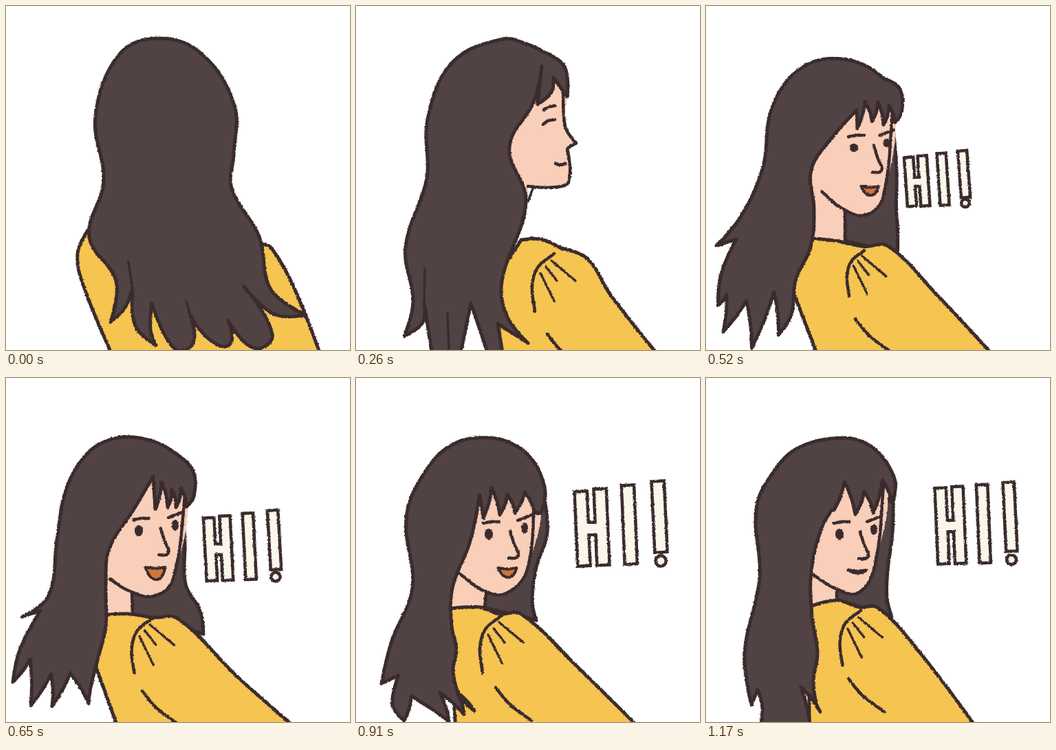
Write an HTML page that moves like this. It is 500 px wide and 500 px high and loops after 1300 ms.

```html
<!DOCTYPE html>
<html>
<head>
<meta charset="utf-8">
<style>
html, body { margin: 0; width: 100%; height: 100%; overflow: hidden; background: #fff }
svg { display: block; width: 100vw; height: 100vh }
path, ellipse { stroke: #3a2b2d; stroke-width: 5; stroke-linejoin: round; stroke-linecap: round; fill: none }
.hair { fill: #514244 }
.shirt { fill: #f6c451 }
.skin { fill: #f9cfb9; stroke: none }
.line { stroke-width: 4.5 }
.thin { stroke-width: 3.5 }
.mouth { fill: #d0763c; stroke-width: 4 }
.eye { fill: #3a2b2d; stroke: none }
.bar { stroke-linecap: square }
.cream { stroke: #faf6ea }
.dot { fill: #faf6ea; stroke-width: 4.5 }
</style>
</head>
<body>
<svg viewBox="0 0 500 500">
  <filter id="crayon" filterUnits="userSpaceOnUse" x="0" y="0" width="500" height="500" color-interpolation-filters="sRGB">
    <feTurbulence type="fractalNoise" baseFrequency=".4" numOctaves="2" seed="4"/>
    <feDisplacementMap in="SourceGraphic" scale="3" xChannelSelector="R" yChannelSelector="G"/>
  </filter>
  <g id="stage" filter="url(#crayon)"></g>
</svg>
<script>
const pt = (x, y, sharp = false) => ({ x, y, sharp });
const add = (p, x, y) => pt(p.x + x, p.y + y);
const mid = (p, q, sharp) => pt((p.x + q.x) / 2, (p.y + q.y) / 2, sharp);

// "x,y" is smooth, "x,y!" a corner. "x,y^h,dx" is a lock's tip, followed by
// a notch h above (and dx beside) the middle of the way to the next point.
function P(text) {
  const words = text.split(' ').map(w => w.split('^'));
  const keys = words.map(([w, notch]) => pt(...w.split(',').map(parseFloat), !!notch || w.endsWith('!')));
  return keys.flatMap((p, i) => {
    if (!words[i][1]) return [p];
    const q = keys[i + 1], [h, dx = 0] = words[i][1].split(',').map(Number);
    const m = mid(p, q), notch = pt(m.x + dx, m.y - h, true);
    return [p, add(mid(p, notch), 2, 0), notch, add(mid(notch, q), 2, 0)];
  });
}

// Average two values of the same structure.
function blend(a, b) {
  if (typeof a === 'number') return (a + b) / 2;
  if (Array.isArray(a)) return a.map((v, i) => blend(v, b[i]));
  if (typeof a !== 'object') return a;
  return Object.fromEntries(Object.keys(a).map(k => [k, blend(a[k], b[k])]));
}

function curve(pts, closed) {
  const n = pts.length;
  const at = i => closed ? pts[(i + n) % n] : pts[Math.max(0, Math.min(n - 1, i))];
  const handle = (i, len) => {
    const p = at(i), a = at(i - 1), b = at(i + 1);
    const k = p.sharp ? 0 : len / 2.7 / (Math.hypot(b.x - a.x, b.y - a.y) || 1);
    return [p.x + (b.x - a.x) * k, p.y + (b.y - a.y) * k];
  };
  let d = `M${pts[0].x},${pts[0].y}`;
  for (let i = 0; i < (closed ? n : n - 1); i++) {
    const p = at(i), q = at(i + 1), len = Math.hypot(q.x - p.x, q.y - p.y);
    d += `C${handle(i, len)} ${handle(i + 1, -len)} ${q.x},${q.y}`;
  }
  return d + (closed ? 'Z' : '');
}

const shape = (kind, pts) => `<path class="${kind}" d="${curve(pts, true)}"/>`;
const line = (kind, ...pts) => `<path class="${kind}" d="${curve(pts)}"/>`;
const oval = (kind, p, rx, ry) => `<ellipse class="${kind}" cx="${p.x}" cy="${p.y}" rx="${rx}" ry="${ry}"/>`;

// Puffed seam, three creases fanning out of it, and the elbow fold.
function sleeve(top, size, elbow) {
  const from = (x, y) => add(top, x * size, y * size);
  let out = line('line', top, from(-24, 20), from(-32, 48), from(-28, 84));
  for (let i = 0; i < 3; i++) {
    const start = from(-4 - 8 * i, 10 + 9 * i);
    const angle = (40 + 12 * i) * Math.PI / 180, len = 46 - 20 * (i % 2);
    out += line('thin', start, add(start, len * Math.cos(angle), len * Math.sin(angle)));
  }
  return out + line('line', elbow, add(elbow, 20, 24), add(elbow, 52, 48));
}

function features({ eyes: [left, right], lid, mouth, smile }) {
  const bridge = add(mid(left, right), 5, 0);
  const { w, open } = smile;
  return line('line', add(left, -8, -16), add(left, 3, -18), add(left, 15, -18)) +
    line('line', add(right, -10, -11), add(right, 0, -15), add(right, 11, -19)) +
    oval('eye', left, 6, lid) + oval('eye', right, 5, lid) +
    line('line', bridge, add(bridge, 6, 19), add(bridge, 12, 33), add(bridge, 8, 39), add(bridge, -2, 39)) +
    shape('mouth', [
      pt(mouth.x - w, mouth.y, true), pt(mouth.x, mouth.y + 1.5), pt(mouth.x + w, mouth.y, true),
      add(mouth, w / 2, open), add(mouth, -w / 3, open)
    ]);
}

// Outlined letters: each bar is a wide dark stroke with a narrower light one on top.
function greeting({ x, y, span, height, rise }) {
  const bars = [0, .25, .61, 1].map(t => {
    const base = y + height - rise * t * .3 - (t === 1 ? height * .17 : 0);
    return `M${x + span * t - 2},${y - rise * t}L${x + span * t + 2},${base}`;
  });
  const d = bars.join('') + `M${x},${y + height / 2}h${span / 4}`;
  const wide = 6 + span * .15, r = 1.5 + span * .055;
  return `<path class="bar" style="stroke-width:${wide}" d="${d}"/>` +
    `<path class="bar cream" style="stroke-width:${wide - 9}" d="${d}"/>` +
    oval('dot', pt(x + span + 2, y + height + 2), r, r);
}

function talk(p) {
  const neck = p.neck;
  return shape('hair', [...p.back, neck[1], neck[0]]) +
    shape('skin', [...p.jaw, ...p.cover, p.body[0], neck[1], neck[0]]) +
    line('line', ...neck) + line('line', ...p.jaw) +
    shape('shirt', p.body) + sleeve(p.shoulder, p.puff, p.elbow) +
    features(p) + shape('hair', p.hair) + greeting(p.word);
}

const away = (body, hair, strands) => shape('shirt', P(body)) + shape('hair', P(hair)) +
  strands.map(s => line('thin', ...P(s))).join('');

function profile() {
  const face = P('301,110 304,175 320,199! 307,207! 311,243 303,261 250,262!');
  return shape('shirt', P('240,340! 268,339 298,352! 336,367 370,420 443,512! 200,515! 208,390!')) +
    sleeve(pt(288, 360), 1, pt(278, 477)) +
    shape('skin', [...face, ...P('250,283! 215,225! 250,100!')]) +
    line('line', ...face) + line('thin', pt(257, 265), pt(250, 284)) +
    ['273,151 280,147 289,145', '272,172 279,167 289,165', '290,229 297,231 304,229']
      .map(s => line('line', ...P(s))).join('') +
    shape('hair', P('213,48 250,56 273,67! 303,88 307,132! 287,104! 284,125 264,143! 270,88! 258,140 223,205 247,285 212,400 220,452 250,490! 206,462! 215,515! 195,515! 167,432! 150,515! 112,515! 99,432! 97,460 70,480! 83,430 72,350 103,250 104,165 140,82')) +
    line('thin', pt(100, 382), pt(99, 434)) + line('thin', pt(133, 447), pt(135, 500));
}

const small = {
  back: P('284,150! 294,235 292,290 275,315 270,345!'),
  jaw: P('186,248 212,276 246,291 271,265 283,120'),
  cover: P('240,110! 145,235!'),
  neck: P('221,285! 220,338!'),
  body: P('165,332! 200,340 248,351 278,347 333,403 420,515! 165,515! 128,425! 120,350!'),
  shoulder: pt(247, 362), puff: .62, elbow: pt(236, 455),
  eyes: P('237,190 279,184'), lid: 4.5, mouth: pt(259, 249), smile: { w: 11, open: 7 },
  hair: P('200,67 237,76 268,100! 290,104 296,135 286,152^26 269,157^36 248,148^30 223,165! 224,160! 185,186 156,228 169,290 160,338 127,388 126,445 91,483^98,26 66,518^68,12 14,471^20,5 25,428! 24,385 38,340! 6,350! 40,295 92,232 98,155 121,103 158,74'),
  word: { x: 297, y: 242, span: 63, height: 40, rise: 8 }
};

const open = {
  back: P('258,190! 260,240 261,300 282,338 287,372!'),
  jaw: P('151,292 178,309 215,317 243,292 262,155'),
  cover: P('215,130! 130,250!'),
  neck: P('183,312! 184,345!'),
  body: P('148,344! 180,343 212,348 250,350 335,433 425,512! 165,515! 130,418! 125,360!'),
  shoulder: pt(213, 349), puff: .95, elbow: pt(198, 455),
  eyes: P('193,222 246,214'), lid: 8, mouth: pt(217, 275), smile: { w: 14.5, open: 16 },
  hair: P('185,86 222,95 250,112! 272,135 273,172 262,187^27 247,188^26 235,188^38 217,191! 214,143! 185,192 150,248 145,300 145,360 133,410 123,450 120,473^46 67,477^46,14 36,476^50,12 10,442! 20,395 50,338! 24,347! 62,316 74,235 88,160 118,110 150,90'),
  word: { x: 297, y: 211, span: 93, height: 76, rise: 11 }
};

const big = {
  back: P('272,165! 278,225 262,275 256,325 262,352!'),
  jaw: P('150,284 185,309 218,313 249,278 260,160'),
  cover: P('180,150! 120,300!'),
  neck: P('189,314! 187,334!'),
  body: P('138,335! 180,333 208,343 240,343 320,418 418,515! 145,515! 140,425! 120,350!'),
  shoulder: pt(212, 345), puff: 1, elbow: pt(203, 450),
  eyes: P('193,227 245,218'), lid: 8, mouth: pt(220, 276), smile: { w: 13.5, open: 12 },
  hair: P('195,87 240,103 264,130! 275,165 269,195 260,196^30 231,196^28 209,199^42 185,204! 180,170! 165,240 140,305 139,360 146,395 141,425 150,460 172,484^31,-18 157,489^37,-24 135,499^36,-22 70,498! 53,475 62,432! 37,444! 52,382 82,305 73,205 95,145 138,98'),
  word: { x: 329, y: 174, span: 112, height: 90, rise: 15 }
};

const end = {
  back: P('272,165! 271,225 264,280 263,320 270,347!'),
  jaw: P('154,285 188,306 222,312 246,270 259,145'),
  cover: P('205,140! 130,270!'),
  neck: P('190,307! 190,322!'),
  body: P('152,332! 190,323 222,333 250,334 310,398 398,515! 150,515! 150,425! 140,350!'),
  shoulder: pt(225, 338), puff: .95, elbow: pt(207, 437),
  eyes: P('194,227 244,220'), lid: 8, mouth: pt(220, 279), smile: { w: 13.5, open: 4 },
  hair: P('200,87 238,98 262,122! 275,150 273,175 270,181^40 243,196^32 217,198^44 186,192! 183,192! 168,218 153,280 154,345 162,400 156,440 160,472 166,485^49,-21 152,510^4 128,518^2 78,512! 82,480 75,453! 66,475! 56,400 78,290 73,190 97,138 135,101'),
  word: { x: 343, y: 168, span: 99, height: 94, rise: 8 }
};

const steps = [
  away('119,326! 104,360 112,405 158,515! 460,515! 418,408 386,352 372,346!',
    '222,47 285,70 332,145 331,215 328,265 368,335 385,412 436,449! 390,448 346,408! 387,478 360,497 323,457! 325,492 295,484 268,450! 272,490 245,498 212,432! 210,470 218,493! 188,465 184,410! 172,440 152,459! 160,400 121,335 142,255 130,160 165,70',
    ['178,372 184,412', '262,429 269,455']),
  away('132,318! 113,350 120,410 160,515! 462,515! 405,418 368,355 347,348!',
    '207,47 270,63 310,130 312,250 343,340 365,418 411,453! 365,448 337,412! 372,480 368,515! 340,515! 312,458! 330,515! 312,515! 264,453! 272,515! 245,515! 208,465! 215,515! 178,460 178,398! 165,435 133,455! 148,410 133,345 142,265 129,165 155,80',
    ['179,374 178,400', '208,433 208,465']),
  profile(),
  ...[small, blend(small, open), open, blend(open, big), big, blend(big, end), end].map(talk)
];

const stage = document.getElementById('stage');
let shown = -1;
function tick() {
  const step = Math.floor(performance.now() % 1300 / 130);
  if (step !== shown) stage.innerHTML = steps[shown = step];
  requestAnimationFrame(tick);
}
tick();
</script>
</body>
</html>
```
